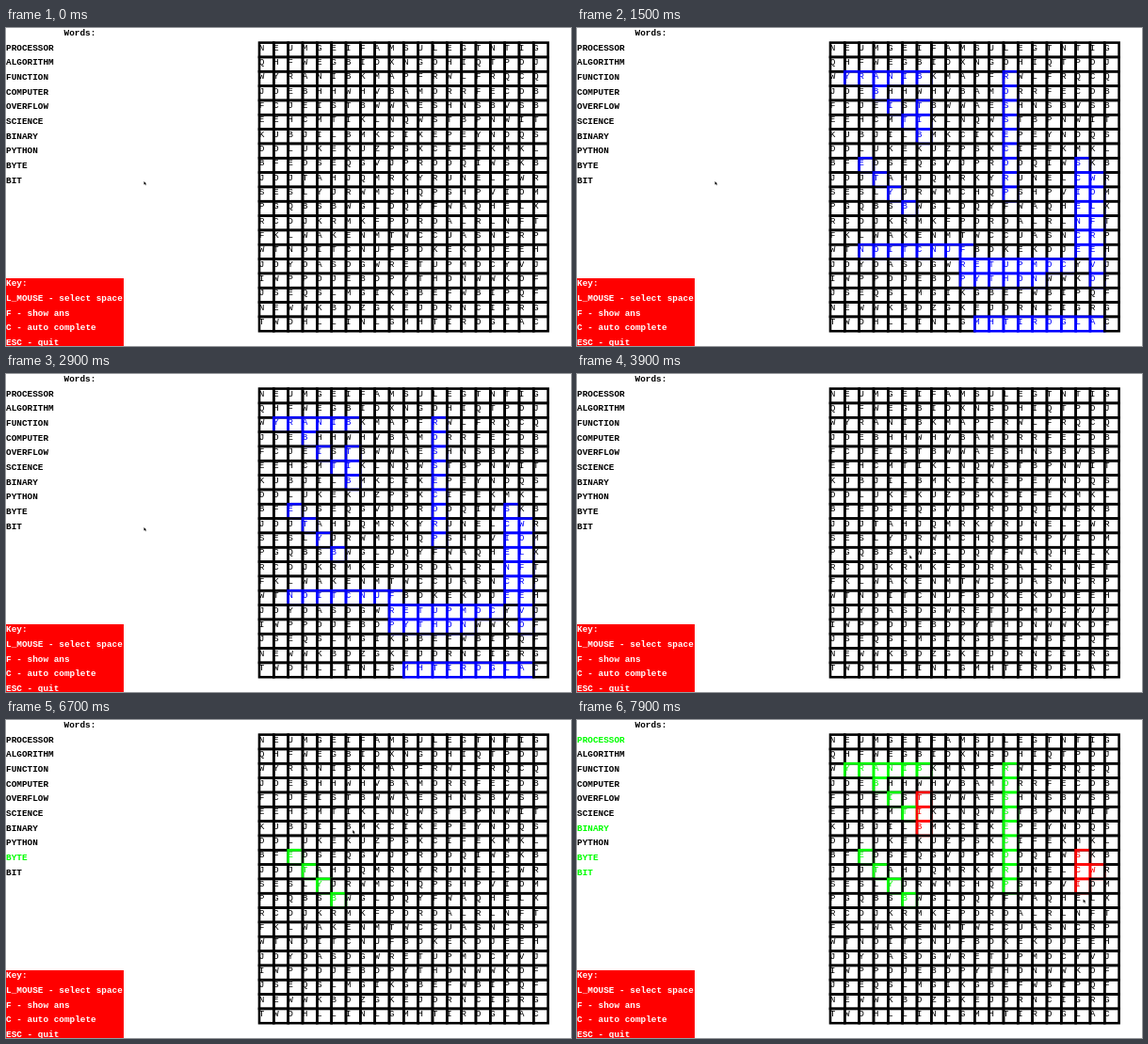
Write an HTML page that moves like this. It is 600 px wide and 338 px high and loops after 8 s.

```html
<!DOCTYPE html>
<html lang="en">
<head>
<meta charset="utf-8">
<title>Word search</title>
<style>
  html, body { margin: 0; width: 100%; height: 100%; overflow: hidden; background: #fff; }
  svg { display: block; width: 100vw; height: 100vh; }
  text { font: 9.4px "Courier New", "Liberation Mono", monospace; white-space: pre; }
  .label { font-weight: bold; }
</style>
</head>
<body>
<svg id="stage" viewBox="0 0 600 338"></svg>
<script>
const LOOP = 8000;
const ANSWERS_ON = 500, ANSWERS_OFF = 3300;
const SIZE = 20, PITCH = 15.33, LEFT = 269, TOP = 15.6;
const BLACK = '#000', BLUE = '#00f', RED = '#f00', GREEN = '#0f0';

const LETTERS = [
  'NEUMGEIFAMSULEGTNTIG', 'QHFWEGBIDXNGOHIQTPDJ',
  'WYRANIBKMAPFRWLFRQCQ', 'JDEBHHWHVBAMORRFECDB',
  'FCJEISTBWWAESHNSBVSB', 'EEHCMTIKLNQWSTBPNWIT',
  'KUBJILBMKCIXEPEYNDQS', 'DDLUKEKUZPSXCIFEKMKL',
  'BFEDSEQGVJPRODQIWSKB', 'JDJTAHJQMRKYRUNELCWR',
  'SESLYJRWMCHQPSHPVIOM', 'PGQBSBWGLDQYFWAQHELX',
  'RCDJKRMKFPDRDALRLNFT', 'FKLWAKENMTWCCUASNCRP',
  'WTNOITCNUFBDKEKDJEEH', 'JDYOASDGWRETUPMOCYVJ',
  'IWPPDJEBDPYTHONWWKOF', 'JSEQSLMGIKGBEFWBIPQF',
  'NEWWKBDZGKEJDRNCIGRG', 'TWDHLLINLGMHTIROGLAC'
];

const WORDS = ['PROCESSOR', 'ALGORITHM', 'FUNCTION', 'COMPUTER', 'OVERFLOW',
  'SCIENCE', 'BINARY', 'PYTHON', 'BYTE', 'BIT'];

// row, column and direction of each run; start and step say when its cells get picked
const run = (word, row, col, dr, dc, start = Infinity, step = 0, decoy = false) => ({
  word, start, step, decoy,
  foundAt: start + step * (word.length - 1),
  cells: [...word].map((_, i) => ({ row: row + dr * i, col: col + dc * i, time: start + step * i }))
});

const RUNS = [
  run('BYTE', 11, 5, -1, -1, 4000, 420),
  run('BIT', 6, 6, -1, 0, 6720, 60, true),
  run('BIT', 3, 3, 1, 1, 6900, 50),
  run('BINARY', 2, 6, 0, -1, 7100, 50),
  run('PROCESSOR', 10, 12, -1, 0, 7430, 30),
  run('SCIENCE', 8, 17, 1, 0, 7760, 50),
  run('ALGORITHM', 19, 18, 0, -1),
  run('FUNCTION', 14, 9, 0, -1),
  run('COMPUTER', 15, 16, 0, -1),
  run('OVERFLOW', 16, 18, -1, 0),
  run('PYTHON', 16, 9, 0, 1)
];
const STRAY = { row: 9, col: 18, time: 7835 };

const stage = document.getElementById('stage');
function add(tag, attrs, content = '') {
  const node = document.createElementNS('http://www.w3.org/2000/svg', tag);
  for (const key in attrs) node.setAttribute(key, attrs[key]);
  node.textContent = content;
  return stage.appendChild(node);
}
const label = (x, y, content, fill = BLACK) => add('text', { x, y, fill, class: 'label' }, content);

label(61.5, 8.3, 'Words:');
const wordLabels = WORDS.map((word, i) => label(0, 23.6 + i * 15.67, word));

add('rect', { x: 0, y: 266, width: 125, height: 72, fill: RED });
['Key:', 'L_MOUSE - select space', 'F - show ans', 'C - auto complete', 'ESC - quit']
  .forEach((line, i) => label(0, 274.3 + i * 15.67, line, '#fff'));

// row by row, so each box covers the right and bottom edges of earlier ones
const boxes = LETTERS.map((line, row) => [...line].map((letter, col) => {
  const x = LEFT + col * PITCH, y = TOP + row * PITCH;
  return [
    add('rect', { x, y, width: PITCH, height: PITCH, fill: 'none', 'stroke-width': 2.6 }),
    add('text', { x: x - 0.3, y: y + 8 }, letter)
  ];
}));

const cursor = add('path', { d: 'M0 0V3.6L.9 2.8L1.6 4.2L2.2 3.9L1.6 2.6H2.6Z', fill: BLACK });

const path = [{ time: 0, x: 146.5, y: 163 }, { time: ANSWERS_OFF, x: 146.5, y: 163 },
  { time: 3800, x: 353, y: 192 }];
for (const { cells } of RUNS)
  for (const { row, col, time } of cells)
    if (time < Infinity) path.push({ time, x: LEFT + col * PITCH + 8, y: TOP + row * PITCH + 9 });

function cursorAt(t) {
  const next = path.findIndex(point => point.time > t);
  if (next < 0) return path[path.length - 1];
  const a = path[next - 1], b = path[next];
  const k = (t - a.time) / (b.time - a.time);
  return { x: a.x + (b.x - a.x) * k, y: a.y + (b.y - a.y) * k };
}

function colorsAt(t) {
  const colors = LETTERS.map(() => Array(SIZE).fill(BLACK));
  const answers = t >= ANSWERS_ON && t < ANSWERS_OFF;
  for (const { cells, foundAt, decoy } of RUNS) {
    const picked = t >= foundAt && !decoy ? GREEN : RED;
    for (const { row, col, time } of cells) {
      if (answers) colors[row][col] = BLUE;
      else if (t >= time) colors[row][col] = picked;
    }
  }
  if (t >= STRAY.time) colors[STRAY.row][STRAY.col] = RED;
  return colors;
}

function draw(t) {
  colorsAt(t).forEach((line, row) => line.forEach((color, col) => {
    const [box, letter] = boxes[row][col];
    box.setAttribute('stroke', color);
    letter.setAttribute('fill', color);
  }));
  wordLabels.forEach((node, i) => {
    const found = RUNS.some(r => r.word === WORDS[i] && !r.decoy && t >= r.foundAt);
    node.setAttribute('fill', found ? GREEN : BLACK);
  });
  const { x, y } = cursorAt(t);
  cursor.setAttribute('transform', `translate(${x} ${y})`);
}

function tick() {
  draw(performance.now() % LOOP);
  requestAnimationFrame(tick);
}
tick();
</script>
</body>
</html>
```
